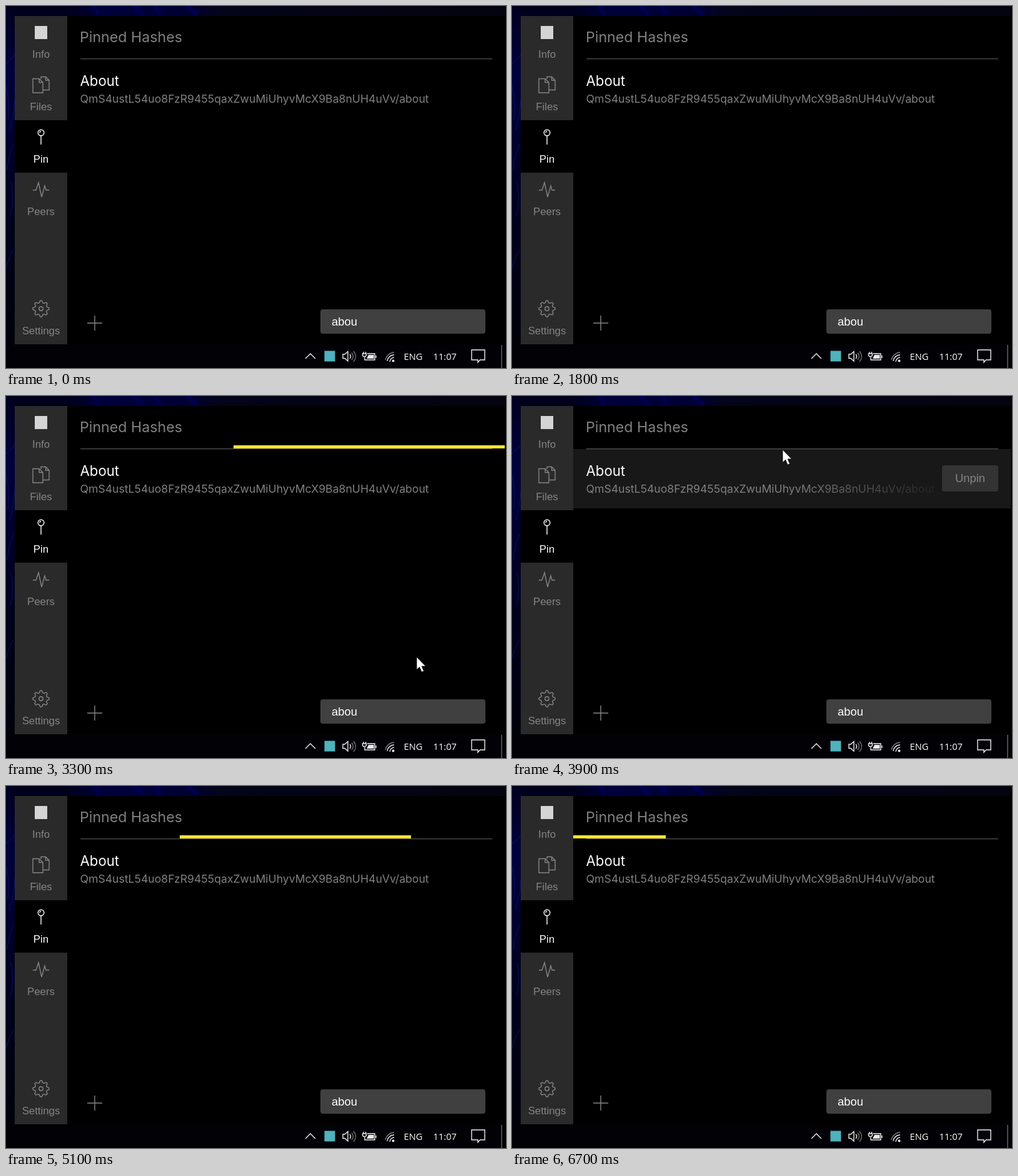
Recreate the animation shown at these times as an HTML page. Size 800 by 580 pixels, loop 6800 ms.

```html
<!DOCTYPE html>
<html lang="en">
<head>
<meta charset="utf-8">
<title>Pinned Hashes</title>
<style>
  html, body { margin: 0; width: 100%; height: 100%; overflow: hidden; background: #010106; }
  svg { display: block; }
  .ui { font: 16.8px "Liberation Sans", Arial, sans-serif; }
  .mid { text-anchor: middle; }
  .field { font-size: 18.375px; }
  .inter { font-family: Inter, sans-serif; }
  .tray { font: 14.7px "Open Sans", "Noto Sans", sans-serif; fill: #fff; }
  .line { fill: none; stroke-width: 1.4; }
</style>
</head>
<body>
<svg width="800" height="580" viewBox="0 0 800 580">
  <defs>
    <linearGradient id="top">
      <stop offset="0" stop-color="#00001c"/>
      <stop offset=".12" stop-color="#00001c"/>
      <stop offset=".2" stop-color="#00003c"/>
      <stop offset=".36" stop-color="#000034"/>
      <stop offset=".43" stop-color="#04041a"/>
      <stop offset="1" stop-color="#04040f"/>
    </linearGradient>
    <linearGradient id="side" x2="0" y2="1">
      <stop offset="0" stop-color="#00001e"/>
      <stop offset=".2" stop-color="#00003c"/>
      <stop offset=".55" stop-color="#000020"/>
      <stop offset="1" stop-color="#01010a"/>
    </linearGradient>
    <linearGradient id="fade">
      <stop offset="0" stop-color="#181818" stop-opacity="0"/>
      <stop offset="1" stop-color="#181818"/>
    </linearGradient>
    <clipPath id="pane"><rect x="98" y="16" width="700" height="526"/></clipPath>
  </defs>

  <!-- desktop -->
  <rect width="800" height="16" fill="url(#top)"/>
  <rect width="14" height="542" fill="url(#side)"/>
  <rect x="798" width="2" height="542" fill="#03030c"/>
  <g class="line" stroke="#0a1478" stroke-opacity=".6">
    <path d="M0 92Q9 86 14 78M0 128Q6 150 3 182M5 200Q13 176 14 150M2 262Q5 236 12 222M8 282Q13 312 7 336M0 420Q6 400 12 390"/>
  </g>
  <path d="M140 0l8 14M205 0l14 14M238 0l10 14M290 0l16 14" stroke="#00004e" stroke-width="7"/>

  <!-- window -->
  <rect x="14" y="16" width="784" height="526"/>
  <path d="M14 16H98V183H14zM14 267H98V542H14z" fill="#2a2a2a"/>
  <rect id="row" x="98" y="85" width="700" height="95" fill="#181818"/>
  <g class="inter">
    <text x="118" y="58" font-size="23.2" fill="#808080">Pinned Hashes</text>
    <text x="118.500" y="128" font-size="22.2" fill="#fff">About</text>
    <text x="118.500" y="155" font-size="17.63" fill="#808080">QmS4ustL54uo8FzR9455qaxZwuMiUhyvMcX9Ba8nUH4uVv/about</text>
  </g>
  <path d="M119 84.600H778" stroke="#505050" stroke-width="1.2"/>
  <g id="unpin">
    <rect x="440" y="104" width="260" height="62" fill="url(#fade)"/>
    <rect x="688" y="111" width="90" height="42" rx="4" fill="#333"/>
    <text class="ui mid field" x="733" y="138" fill="#858585">Unpin</text>
  </g>
  <rect id="bar" y="79" height="5" fill="#fde52b" clip-path="url(#pane)"/>

  <!-- sidebar -->
  <g class="ui mid" fill="#858585">
    <text x="56" y="83">Info</text>
    <text x="56" y="167">Files</text>
    <text x="56" y="251" fill="#fff">Pin</text>
    <text x="56" y="334.500">Peers</text>
    <text x="56" y="525.500">Settings</text>
  </g>
  <rect x="46" y="32" width="20" height="21" fill="#d4d4d4"/>
  <g class="line" stroke="#858585">
    <path d="M43 116.500h10l6 6v16.500H43zM53 116.500v6h6M56 117v-3.500h7.500L69 119v15.500H59M63.500 113.500V119H69"/>
    <path d="M43 295h5l4-12 5 23 5-18 2 7h5"/>
    <path id="gear" stroke-linejoin="round"/>
    <circle cx="56" cy="485" r="3.2"/>
    <path d="M130 508h24M142 496v24"/>
  </g>
  <g class="line" stroke="#fff">
    <circle cx="56" cy="203" r="4.8"/>
    <path d="M56 208v14M53.800 203a2.200 2.200 0 0 1 2.200-2.200"/>
  </g>

  <rect x="503" y="486" width="264" height="39" rx="4" fill="#404040"/>
  <text class="ui field" x="521" y="511.500" fill="#fff">abou</text>

  <!-- taskbar -->
  <g class="line" stroke="#eee">
    <path d="M479 565l8-8 8 8"/>
    <path d="M539 558h3l5-4.500v15.500l-5-4.500h-3z"/>
    <path d="M550 558q3 3.500 0 7"/>
    <path d="M553 555.500q5 6 0 11.500M556 553q7 8.500 0 17" stroke="#777"/>
    <path d="M578 557h12v10H574v-4M570.500 557h6v3q-3 4-6 0zM572 554v3M575.500 554v3"/>
    <path d="M580 559h8.500v6H577z" fill="#eee" stroke="none"/>
    <path d="M592 560v4"/>
    <path d="M607 567a15 15 0 0 1 14-12" stroke="#777"/>
    <path d="M610 569a11 11 0 0 1 11-10M614 570a7.500 7.500 0 0 1 7-7"/>
    <circle cx="619.500" cy="568.500" r="1.300" fill="#eee"/>
    <path d="M745 551h21v16h-7.500l-3.500 4v-4h-10z"/>
    <path d="M793 543v37" stroke="#6c6c6c"/>
  </g>
  <rect x="509.500" y="552.500" width="17" height="17" fill="#4fb2bc"/>
  <text class="tray" x="636.500" y="567">ENG</text>
  <text class="tray" x="683.500" y="567">11:07</text>

  <path id="cursor" d="M0 0V20.500L4.600 16.300 8 24.300 11.600 22.800 8.200 15H14.500z" fill="#fff" stroke="#000" stroke-width=".8"/>
</svg>
<script>
const LOOP = 6800, STEP = 100;
const $ = id => document.getElementById(id);
const show = (el, on) => el.style.display = on ? '' : 'none';

// Linear interpolation through [time, value] points.
function track(points, t) {
  let i = 1;
  while (i < points.length - 1 && t > points[i][0]) i++;
  const [t0, a] = points[i - 1], [t1, b] = points[i];
  return a + (b - a) * Math.min(1, Math.max(0, (t - t0) / (t1 - t0)));
}

const sweeps = [340, 2300, 4300, 6300];
const barLeft = [[0, -210], [200, -134], [400, -62], [800, 180], [1000, 266], [1100, 330], [1360, 665], [1400, 720]];
const barWidth = [[560, 210], [980, 490]];
const cursorX = [[2900, 800], [3000, 766], [3300, 657], [3700, 585], [3800, 505], [3900, 433], [4100, 375]];
const cursorY = [[2900, 600], [3000, 558], [3300, 418], [3700, 359], [3800, 172], [3900, 86], [4100, -40]];

$('gear').setAttribute('d', 'M' + Array.from({ length: 32 }, (_, i) => {
  const r = i % 4 < 2 ? 13 : 9.8, a = (i - 0.5) * Math.PI / 16;
  return [56 + r * Math.cos(a), 485 + r * Math.sin(a)].map(v => v.toFixed(2));
}).join('L') + 'Z');

function draw(t) {
  const start = sweeps.filter(s => s <= t).pop();
  const phase = t - start;
  show($('bar'), phase > 0 && phase < 1400);
  if (phase > 0) {
    $('bar').setAttribute('x', 98 + track(barLeft, phase));
    $('bar').setAttribute('width', track(barWidth, phase));
  }

  const x = track(cursorX, t), y = track(cursorY, t);
  const hover = y >= 85 && y < 180;
  $('cursor').setAttribute('transform', `translate(${x} ${y})`);
  show($('cursor'), t > 2900 && t < 4100);
  show($('row'), hover);
  show($('unpin'), hover);
}

const begin = performance.now();
function tick() {
  const t = (performance.now() - begin) % LOOP;
  draw(Math.floor(t / STEP) * STEP);
  requestAnimationFrame(tick);
}
tick();
</script>
</body>
</html>
```
